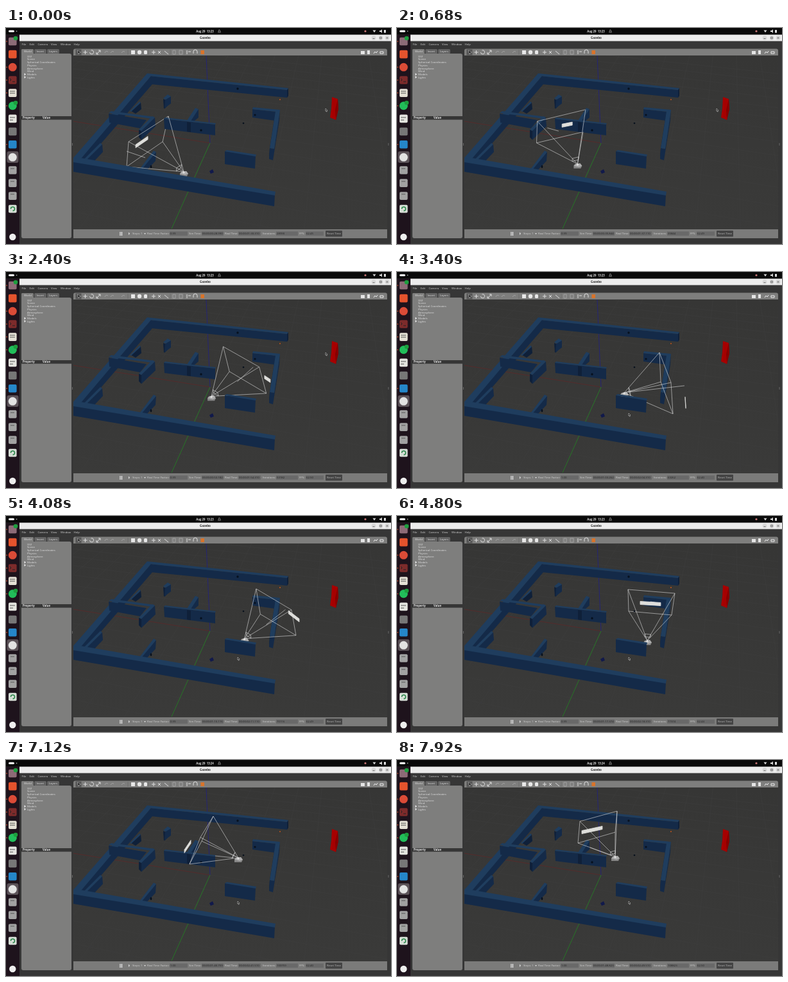
Write an HTML page that moves like this. It is 600 by 338 pixels and loops after 8000 ms.

```html
<!DOCTYPE html>
<html lang="en">
<head>
<meta charset="utf-8">
<title>Robot simulation</title>
<style>
html, body { margin: 0; width: 100%; height: 100%; overflow: hidden; background: #222; }
svg { display: block; width: 100vw; height: 100vh; }
text { font-family: "Open Sans", "Noto Sans", sans-serif; font-size: 4.3px; white-space: pre; }
.bold { font-weight: 700; }
.wire { fill: none; stroke: #dedede; stroke-width: .6; }
.top { fill: #1f3d5e; }
.face { fill: #142a48; }
.shade { fill: #0f2039; }
</style>
</head>
<body>
<svg id="stage" viewBox="0 0 600 338" preserveAspectRatio="none">
  <defs>
    <clipPath id="view"><rect x="105" y="43" width="489" height="272"/></clipPath>
    <linearGradient id="floor" x2="0" y2="1"><stop stop-color="#363635"/><stop offset="1" stop-color="#3a3a39"/></linearGradient>
  </defs>
  <rect width="600" height="338" fill="#363636"/>
  <rect width="600" height="10.500" fill="#090909"/>
  <rect x="4" y="3.500" width="9" height="3" rx="1.500" fill="#fff"/>
  <circle cx="16.500" cy="5" r="1" fill="#888"/>
  <text id="clock" class="bold" x="310" y="6.500" text-anchor="middle" fill="#ddd"></text>
  <path d="M330.500 6.500q1-1 1-2.500t1-1.200 1 1.200 1 2.500z" fill="none" stroke="#ccc" stroke-width=".6"/>
  <g fill="#ddd"><circle cx="560" cy="5" r="1.600" fill="#c77"/><path d="M571.500 3.500h5l-2.500 3.500zM582 4h2l2-2v6l-2-2h-2z"/><rect x="589" y="3" width="3" height="4.500"/></g>

  <rect x="21" y="10.500" width="579" height="10" fill="#ececec"/>
  <text class="bold" x="310.500" y="17.200" text-anchor="middle" fill="#333" style="font-size:4.600px">Gazebo</text>
  <g fill="#d8d8d8"><circle cx="573" cy="15.500" r="3.400"/><circle cx="584" cy="15.500" r="3.400"/><circle cx="594" cy="15.500" r="3.400"/></g>
  <path d="M571.500 16.500h3M582.700 14.200h2.600v2.600h-2.600zM592.700 14.200l2.600 2.600m0-2.600l-2.600 2.600" fill="none" stroke="#333" stroke-width=".6"/>
  <g id="menu" fill="#d2d2d2"></g>

  <rect y="10.500" width="21" height="327.500" fill="#1e131c"/>
  <g id="dock"></g>

  <g fill="#636363"><rect x="24" y="33" width="19" height="8" rx="1.500"/><rect x="44" y="33" width="19" height="7" rx="1.500"/><rect x="64" y="33" width="19" height="7" rx="1.500"/></g>
  <rect x="24" y="40" width="78" height="289" rx="3" fill="#7e7e7d"/>
  <rect x="24" y="33" width="19" height="10" rx="1.500" fill="#7e7e7d"/>
  <g id="tree" fill="#e2e2e2"></g>
  <path d="M28.500 70.500v4l2.500-2zM28.500 75v4l2.500-2z" fill="#eee"/>
  <rect x="24" y="138" width="78" height="5.500" fill="#363636"/>
  <g class="bold" fill="#e5e5e5"><text x="26" y="142.300">Property</text><text x="57" y="142.300">Value</text></g>
  <path d="M62 137.500h4M103.500 180v4M596 180v4" stroke="#777" stroke-width=".8"/>

  <rect x="105" y="32.500" width="489" height="13" rx="3" fill="#7e7e7d"/>
  <g id="tools"></g>

  <g clip-path="url(#view)">
    <rect x="105" y="43" width="489" height="272" fill="url(#floor)"/>
    <path id="grid" fill="none" stroke="#3f3f3e" stroke-width=".5"/>
    <path d="M105 146L318 180" stroke="#672020" stroke-width=".6"/>
    <path d="M318 180L258 314" stroke="#238423" stroke-width=".8"/>
    <path d="M312 43L318 180" stroke="#202086" stroke-width=".8"/>

    <g id="backWalls">
      <path class="face" d="M224 75L438 97V109L226 88Z"/>
      <path class="shade" d="M438 97L440 94V106L438 109Z"/>
      <path class="top" d="M220 71L440 94L438 97L223 75Z"/>
      <path class="face" d="M226 75L228 88L122 211L112 209Z"/>
      <path class="top" d="M220 71L226 75L113 209L105 206V203Z"/>
      <path class="shade" d="M195 130L210 116L211 127L202 134Z"/>
      <path class="top" d="M193 130L208 115L210 117L195 131Z"/>
      <path class="shade" d="M245 111L249 113V125L246 126Z"/>
      <path class="face" d="M248 112L257 107V118L247 126Z"/>
      <path class="top" d="M245 110L252 104L257 107L249 112Z"/>
      <path class="face" d="M160 134L219 144L209 157L161 148Z"/>
      <path class="top" d="M164 130L231 139L228 142L160 133Z"/>
      <path class="shade" d="M207 159L211 161V175L207 171Z"/>
      <path class="face" d="M211 160L232 140L233 154L211 175Z"/>
      <path class="top" d="M207 159L228 138L232 140L211 161Z"/>
      <path class="face" d="M384 127L421 131L419 145L384 140Z"/>
      <path class="top" d="M385 124L427 128L421 131L384 127Z"/>
      <path class="shade" d="M420 131L411 188L410 205L419 146Z"/>
      <path class="face" d="M411 188L418 189L427 129L426 145L416 207L410 205Z"/>
      <path class="top" d="M420 130L427 128L418 189L411 188Z"/>
    </g>
    <path id="rearFar" class="wire"/>
    <g id="midWalls">
      <path class="face" d="M300 127V140L288 150L285 145Z"/>
      <path class="top" d="M295 125L300 127L287 147L282 145Z"/>
      <path class="face" d="M246 142L326 151V168L247 158Z"/>
      <path class="shade" d="M282 147L288 148V163L282 162Z"/>
      <path class="top" d="M248 140L327 149L326 151L246 142Z"/>
      <path class="face" d="M150 182L151 194L134 212L122 209Z"/>
      <path class="top" d="M147 180L150 182L124 208L120 207Z"/>
      <path class="face" d="M234 194L233 208L217 225L210 222Z"/>
      <path class="top" d="M230 192L234 194L211 222L208 221Z"/>
    </g>
    <g fill="#07101d"><circle cx="361" cy="95" r="1.700"/><circle cx="388" cy="136" r="1.600"/><circle cx="304" cy="160" r="1.700"/><ellipse cx="226" cy="217" rx="1.300" ry="2.200"/><circle cx="370" cy="149" r="1.300"/></g>
    <circle cx="427" cy="112" r="1.100" fill="#b4541d"/>
    <path d="M317 224L322 221L324 226L319 228Z" fill="#11194b"/>

    <g id="robot"><path d="M-6 3L-4 0L4-1L7 3L5 7L-6 7Z" fill="#858585"/><path d="M-6 3L-3 0L4-1L7 3L2 5Z" fill="#adadad"/><circle cy="1" r="1.700" fill="#ddd"/></g>
    <path id="patch" fill="#dededb" stroke="#dededb" stroke-width=".8"/>
    <path id="frontFar" class="wire"/>
    <path id="rays" class="wire"/>

    <path class="face" d="M341 193L389 200L388 220L341 213Z"/>
    <path class="top" d="M341 193L344 191L390 198L389 201Z"/>
    <path class="face" d="M105 209L419 261L418 279L105 225Z"/>
    <path class="top" d="M105 205L115 203L420 256L419 262L105 210Z"/>

    <path d="M508 108L517 111L518 127L514 144L505 140L507 126Z" fill="#a60000"/>
    <path d="M517 111L518 127L514 144L513 128Z" fill="#860000"/>
    <path id="cursor" d="M-1-2L2 1L.700 1.300L1.300 2.800L.300 3L-.200 1.500L-1 2Z" fill="#111" stroke="#eee" stroke-width=".5"/>
  </g>

  <rect x="105" y="315" width="489" height="14" fill="#7b7b7a"/>
  <path d="M178 319v6M180.500 319v6" stroke="#eee" stroke-width="1.200"/>
  <path d="M191 319.500v4.500l2-2.200zM215 321l3 0l-1.500 2z" fill="#ddd"/>
  <g id="status"></g>
  <rect x="498" y="317" width="26" height="9.500" rx="1" fill="#444"/>
  <text x="511" y="323.300" text-anchor="middle" fill="#bbb">Reset Time</text>
</svg>

<script>
const DURATION = 8000;
const SQUASH = 0.65;
const HALF_HEIGHT = 18;
const el = id => document.getElementById(id);

function add(parent, tag, attrs, text = "") {
  const node = document.createElementNS("http://www.w3.org/2000/svg", tag);
  for (const key in attrs) node.setAttribute(key, attrs[key]);
  node.textContent = text;
  return el(parent).appendChild(node);
}

const path = (points, close) =>
  "M" + points.map(p => p.map(v => v.toFixed(2)).join(" ")).join("L") + (close ? "Z" : "");

// Static interface
[["File", 24.5], ["Edit", 36.5], ["Camera", 49.5], ["View", 70], ["Window", 85], ["Help", 105.5]]
  .forEach(([label, x]) => add("menu", "text", { x, y: 26.7 }, label));
["World", "Insert", "Layers"].forEach((label, i) => add("tree", "text", { x: 28 + i * 19.5, y: 37.7 }, label));
["GUI", "Scene", "Spherical Coordinates", "Physics", "Atmosphere", "Wind", "Models", "Lights"]
  .forEach((label, i) => add("tree", "text", { x: 33, y: 45.7 + i * 4.7 }, label));

const dockColors = ["#8d6b77", "#e5532d", "#db4b37", "#7d2b2b", "#e5e0d5", "#22bd5a", "#e4e4df",
  "#777", "#2586c9", "#e2e2e2", "#a2a2a2", "#a2a2a2", "#a2a2a2", "#d5ddd5"];
add("dock", "rect", { x: 1.5, y: 193, width: 18, height: 18, rx: 3, fill: "#5c5359" });
dockColors.forEach((fill, i) => {
  const y = 21 + i * 20.15;
  if ([2, 5, 9].includes(i)) add("dock", "circle", { cx: 10.3, cy: y, r: 6.5, fill });
  else add("dock", "rect", { x: 4, y: y - 6.3, width: 12.6, height: 12.6, rx: 2, fill });
  if ([0, 2, 3, 4, 5, 8].includes(i)) add("dock", "circle", { cx: 1.2, cy: y, r: .8, fill: "#e5532d" });
});
[16, 117].forEach(cy => add("dock", "circle", { cx: 15, cy, r: 3.3, fill: "#1d9e3e" }));
add("dock", "path", { d: "M6 79l2 2-2 2M10 84h4", stroke: "#222", fill: "none" });
add("dock", "path", { d: "M6 99h8M6 102h8M6 140h8M6 144h5M7 220h6M7 240h6M7 260h6", stroke: "#555", fill: "none" });
add("dock", "path", { d: "M7.5 283a3 3 0 1 1 3 3", stroke: "#278447", fill: "none", "stroke-width": 1.5 });
add("dock", "circle", { cx: 10.3, cy: 327, r: 5.2, fill: "#eee" });

add("tools", "rect", { x: 108.5, y: 33.5, width: 9, height: 9, fill: "#555" });
add("tools", "path", { d: "M111 35l2 6 1-2 2.500-1z", fill: "#111", stroke: "#ddd", "stroke-width": .5 });
add("tools", "path", { d: "M120.500 38h6M123.500 35v6M130.500 38a3 3 0 1 0 2-3M141 41l6-6M141 38v3h3M144 35h3v3M227 38h6M230 35v6M237 36l4 4m0-4l-4 4M247 36l6 5M282 35v6M284 37h4M292 40v-3a3 3 0 0 1 6 0v3",
  fill: "none", stroke: "#ddd", "stroke-width": 1 });
add("tools", "path", { d: "M154 39q1-4 5-2M163 39q2-4 5-2M180 39q2-4 5-2M260 35h4v6h-4zM270 35h5v6h-5z",
  fill: "none", stroke: "#aaa", "stroke-width": .8 });
add("tools", "path", { d: "M190 34v8M222 34v8M256 34v8M278 34v8", stroke: "#666", "stroke-width": .6 });
add("tools", "rect", { x: 195, y: 35, width: 6, height: 6, fill: "#e8e8e8" });
add("tools", "circle", { cx: 208, cy: 38, r: 3.2, fill: "#e8e8e8" });
add("tools", "rect", { x: 215, y: 35, width: 5, height: 6, rx: 1.5, fill: "#e8e8e8" });
add("tools", "rect", { x: 303.5, y: 35, width: 5.5, height: 6, fill: "#d8742b" });
add("tools", "path", { d: "M553 36h6v5h-6zM563 35h4v6h-4z", fill: "#e5e5e5" });
add("tools", "path", { d: "M573 40l2-3 2 2 2-3M583 37h5v3h-5z", fill: "none", stroke: "#eee" });

const labels = [["Steps: 1", 197], ["Real Time Factor:", 220], ["Sim Time:", 285],
  ["Real Time:", 341], ["Iterations:", 400], ["FPS:", 457]];
labels.forEach(([label, x]) => add("status", "text", { x, y: 323.3, fill: "#d2d2d2" }, label));
const fields = [[255, 28], [305, 34], [362, 35], [421, 34], [467, 28]].map(([x, width]) => {
  add("status", "rect", { x, y: 318.5, width, height: 6.5, fill: "#696969" });
  return add("status", "text", { x: x + 1, y: 323.3, fill: "#222" });
});

// Ground grid seen by the scene camera
function project(a, b) {
  const u = -32 + .97 * a + .2415 * b;
  const v = 422 - .2415 * a + .97 * b;
  const depth = .781 * v + 211;
  return [350 + 540 * u / depth, 180 + 540 * (263.6 - .625 * v) / depth];
}
let gridPath = "";
for (let k = -9; k <= 9; k++) {
  const c = k * 52;
  gridPath += path([project(c, -240), project(c, 468)]) + path([project(-468, c / 1.5), project(468, c / 1.5)]);
}
el("grid").setAttribute("d", gridPath);

// Poses: apex, far corners (TL TR BR BL), image patch ends, loose sensor line
const poses = [
  [0, [277, 225], [191, 178, 253, 138, 244, 178, 188, 217], [202, 185, 221, 172], [188, 193, 217, 203]],
  [1400, [286, 200], [259, 120, 332, 125, 337, 158, 266, 151], [323, 144, 329, 144], [296, 138, 324, 139]],
  [3400, [354, 189], [409, 126, 427, 173, 430, 222, 411, 172], [449, 198, 450, 211], [448, 178, 360, 188]],
  [4800, [390, 195], [360, 115, 433, 121, 428, 155, 361, 149], [379, 136, 411, 138], [395, 134, 411, 137]],
  [5800, [394, 158], [356, 91, 420, 88, 417, 121, 353, 125], [364, 112, 376, 111], [399, 108, 399, 125]],
  [7120, [362, 153], [303, 121, 323, 88, 305, 127, 286, 163], [278, 143, 288, 128], [326, 150, 355, 153]],
  [7920, [340, 151], [285, 96, 343, 80, 340, 113, 282, 130], [288, 113, 320, 106], [301, 137, 335, 150]]
];

const mix = (a, b, k) => a + (b - a) * k;
const ramp = (t, a, b) => Math.min(1, Math.max(0, (t - a) / (b - a)));

function toPolar(point, apex, lift) {
  const x = point[0] - apex[0], y = (point[1] - apex[1] - lift) / SQUASH;
  return [Math.atan2(y, x), Math.hypot(x, y)];
}

// Turns a point about the robot on the foreshortened ground plane
function swing(p, q, from, to, apex, k, lift) {
  const [a, r] = toPolar(p, from, lift), [b, s] = toPolar(q, to, lift);
  const turn = Math.atan2(Math.sin(b - a), Math.cos(b - a));
  const angle = a + turn * k, radius = mix(r, s, k);
  return [apex[0] + radius * Math.cos(angle), apex[1] + radius * Math.sin(angle) * SQUASH + lift];
}

function poseAt(t) {
  let i = 0;
  while (i < poses.length - 2 && t >= poses[i + 1][0]) i++;
  const from = poses[i], to = poses[i + 1];
  const k = ramp(t, from[0], to[0]);
  const apex = from[1].map((v, n) => mix(v, to[1][n], k));
  const points = (part, lift) => {
    const result = [];
    for (let n = 0; n < from[part].length; n += 2) {
      result.push(swing(from[part].slice(n, n + 2), to[part].slice(n, n + 2), from[1], to[1], apex, k, lift(n)));
    }
    return result;
  };
  return {
    apex,
    far: points(2, n => n < 4 ? -HALF_HEIGHT : HALF_HEIGHT),
    patch: points(3, () => 0),
    line: points(4, () => 0)
  };
}

function timeText(ms) {
  const pad = (v, n) => String(v).padStart(n, "0");
  const s = Math.floor(ms / 1000);
  return `00:00:${pad(Math.floor(s / 60), 2)}:${pad(s % 60, 2)}.${pad(ms % 1000, 3)}`;
}

function draw(t) {
  const { apex, far, patch, line } = poseAt(t);
  const near = far.map(p => p.map((v, n) => mix(apex[n], v, .13)));
  const farPath = path(far, true);
  const inFront = apex[1] > 175;
  el("rearFar").setAttribute("d", inFront ? farPath : "");
  el("frontFar").setAttribute("d", inFront ? "" : farPath);
  el("rays").setAttribute("d", far.map(p => path([apex, p])).join("") + path(near, true) + path(line));
  el("patch").setAttribute("d", path([
    [patch[0][0], patch[0][1] - 2.5], [patch[1][0], patch[1][1] - 2.5],
    [patch[1][0], patch[1][1] + 2.5], [patch[0][0], patch[0][1] + 2.5]], true));
  el("robot").setAttribute("transform", `translate(${apex})`);

  const move = ramp(t, 2700, 3300);
  const ease = move * move * (3 - 2 * move);
  el("cursor").setAttribute("transform", `translate(${mix(499, 362, ease)} ${mix(128, 223, ease)})`);
  el("clock").textContent = t < 5000 ? "Aug 29  13:23" : "Aug 29  13:24";

  const sim = Math.floor(28980 + 10.08 * t), real = Math.floor(90300 + 10 * t);
  const values = [t % 2000 < 1000 ? "0.99" : "1.00", timeText(sim), timeText(real), sim,
    (62.45 + .05 * Math.sin(t / 300)).toFixed(2)];
  fields.forEach((field, i) => { field.textContent = values[i]; });
}

function tick() {
  draw(performance.now() % DURATION);
  requestAnimationFrame(tick);
}
tick();
</script>
</body>
</html>
```
